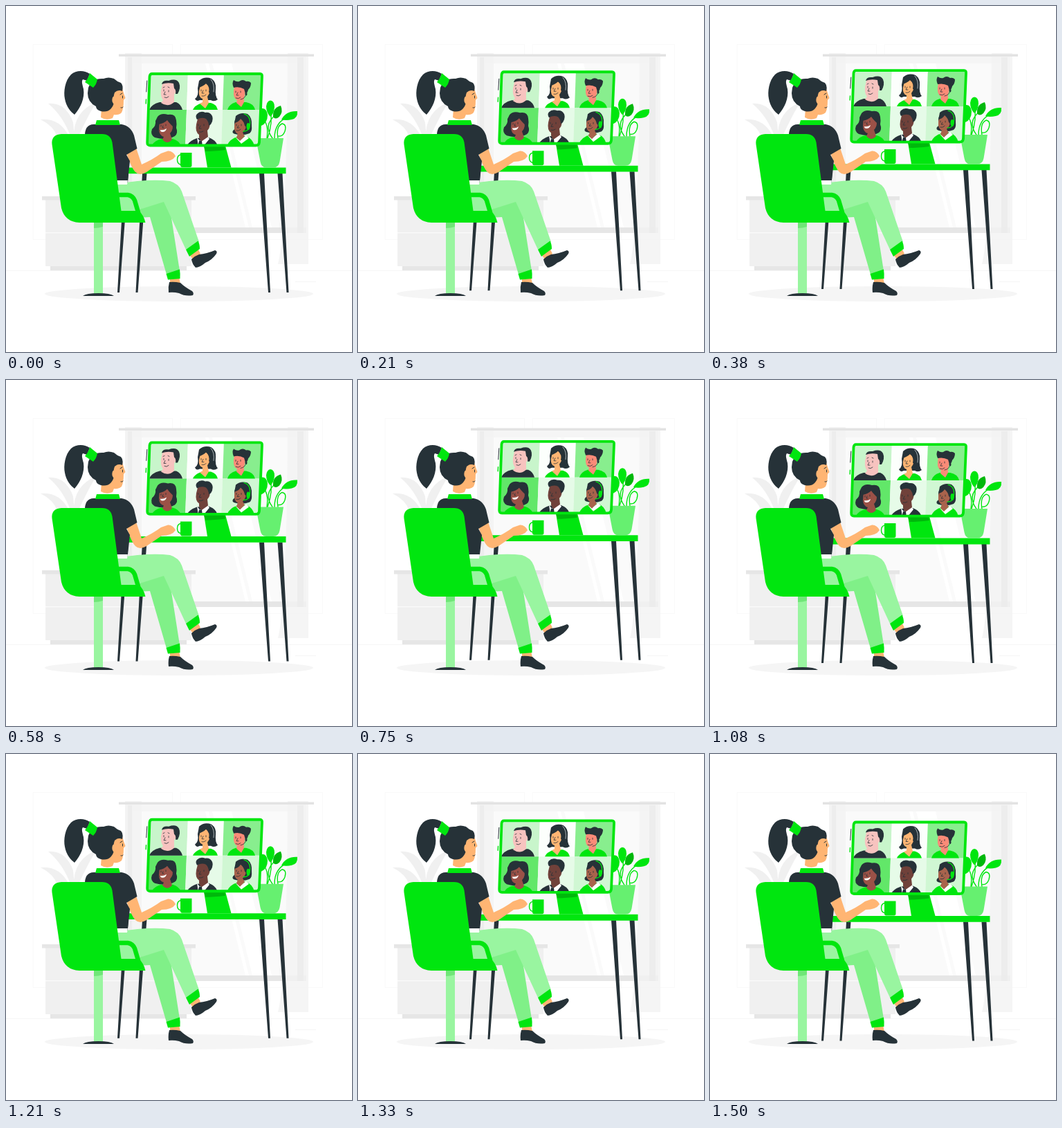
An HTML page that plays this animation: 500x500 px, repeating every 1.54 s.

```html
<!DOCTYPE html>
<html lang="en">
<head>
<meta charset="utf-8">
<title>Video meeting</title>
<style>
html, body { margin: 0; width: 100%; height: 100%; overflow: hidden; background: #fff; }
svg { display: block; width: 100%; height: 100%; }
.g { fill: #00e60f; }
.d { fill: #263238; }
.l { fill: #99f5a0; }
.w { fill: #fff; }
.s { fill: #ffb573; }
.line { fill: none; stroke-linecap: round; stroke-linejoin: round; }
.ink { stroke: #263238; }
.stem { stroke: #00e60f; }
</style>
</head>
<body>
<svg viewBox="0 0 500 500">
  <defs>
    <clipPath id="screen"><path d="M211 99H366Q369 99 369 102L365 197Q365 201 361 201H208Q204 201 205 197L208 102Q208 99 211 99Z"/></clipPath>
  </defs>

  <!-- room -->
  <g>
    <path class="line" stroke="#f9f9f9" d="M39.500 55.500H240.500V337.500H39.500ZM252.500 55.500H457.500V337.500H252.500Z"/>
    <path fill="#ededed" d="M172 73H434V328H172Z"/>
    <path fill="#f5f5f5" d="M172 73H434V320H172Z"/>
    <path fill="#fafafa" d="M183 83H421V320H183Z"/>
    <path fill="#fff" d="M298 83H326L384 320H356ZM288 83H293L351 320H346Z"/>
    <path fill="#e6e6e6" d="M268 320H434V328H268Z"/>
    <path fill="#f3f3f3" opacity=".8" d="M407 68H437V373H393Q406 320 407 68ZM172 68H196V275H172Z"/>
    <path fill="#ebebeb" opacity=".7" d="M421 74H430V328H421ZM176 74H182V275H176Z"/>
    <path fill="#e3e3e3" d="M163 69.500H445V73H163Z"/>
    <path fill="#f0f0f0" d="M61 141Q86 139 97 168L99 190H94Q82 158 61 141ZM50 164Q77 161 91 188H74Q68 173 50 164ZM98 190Q97 152 131 139Q121 153 104 190Z"/>
    <path fill="#f0f0f0" d="M57 280H268V376H57Z"/>
    <path fill="#e6e6e6" d="M52 275H274V280.500H52ZM64 376H261V382H64Z"/>
    <path fill="#fafafa" d="M57 327H268V328.500H57Z"/>
    <path fill="#ebebeb" d="M0 382H500V382.600H0ZM418 398H448V398.600H418Z"/>
    <ellipse cx="250" cy="416" rx="194" ry="11" fill="#f5f5f5"/>
  </g>

  <!-- floating desk -->
  <g id="desk">
    <path class="d" d="M171 242H177L164 414H161ZM197 242H203.500L190.500 414H187.500ZM366 242H373L382 414H379ZM392.500 242H399.500L408.500 414H405.500Z"/>
    <path class="g" d="M163 233.500H404.500V242.300H163Z"/>

    <g>
      <path class="line stem" stroke-width="1.400" d="M377 191Q380 170 371 164M378 191Q386 168 382 150M385 191Q371 172 390 157M388 191Q388 168 408 160M393 191Q390 174 399 170Q406 171 403 181Q400 189 394 188"/>
      <path class="g" d="M366 149Q376 145 378 157Q378 169 369 173Q361 162 366 149ZM382 136.500Q388 137 388 146Q387 156 382 160Q376 154 376 145Q377 137 382 136.500ZM421 152Q422 162 413 164Q404 166 398 164Q405 151 421 152Z"/>
      <path fill="#00b80c" d="M397 144Q401 153 395 160Q389 165 386 160Q385 147 397 144Z"/>
      <path fill="#66f070" d="M361 191H401L395.500 225Q394 233.500 386 233.500H376Q369 233.500 367.500 225Z"/>
    </g>

    <path class="g" d="M286 202H317L325.500 233.500H291Z"/>
    <path d="M286 202H316L317 208Q300 210 288 210Z" fill="#00b80c"/>
    <path class="g" d="M252 212H268.500V230Q268.500 233 266 233H254.500Q252 233 252 230Z"/>
    <path class="line stem" stroke-width="1.400" d="M252 215Q247.500 216 247.500 222T252 229"/>

    <g clip-path="url(#screen)">
      <path fill="#c8f5cb" d="M200 95H263L261 150H200Z"/>
      <path fill="#fcfffc" d="M263 95H315L313 150H261Z"/>
      <path fill="#88ee8e" d="M315 95H375V150H313Z"/>
      <path fill="#62e769" d="M200 150H261L259 205H200Z"/>
      <path fill="#e6fbe8" d="M261 150H313L311 205H259Z"/>
      <path fill="#d0f7d3" d="M313 150H375V205H311Z"/>

      <g>
        <path class="d" d="M207 150Q210 142 222 139L246 139Q253 142 255 150Z"/>
        <path fill="#f7c3bf" d="M226 113Q232 107 240 110Q248 114 246 124L243 128L243 139Q234 147 224 140L227 136Q223 131 224 122Z"/>
        <path class="d" d="M225 113Q226 107 235 108Q246 104 250 111Q253 118 248 127L245 127Q246 121 243 119L242 112Q233 110 225 113Z"/>
        <path class="line ink" stroke-width=".8" d="M228 121V123M235 122V124M227 118L229 117M234 117L236 118M230 124L228 128L231 128M229 132Q232 134 235 131"/>
      </g>
      <g>
        <path class="d" d="M279 108Q287 101 297 105Q304 110 303 119Q302 131 306 135Q301 139 296 136L280 136Q275 139 273 134Q279 130 277 119Z"/>
        <path class="g" d="M270 150Q272 144 283 140L296 140Q304 142 306 150Z"/>
        <path class="s" d="M281 114Q287 110 294 114Q297 123 291 131L293 140L288 148L280 141L284 139V134Q278 132 279 123Z"/>
        <path class="d" d="M278 118Q280 107 291 108Q300 114 297 126L293 125Q295 117 289 112Q285 116 278 118Z"/>
        <path class="line ink" stroke-width=".8" d="M282 121V123M289 121V123M285 122L283 126L286 126M283 130Q287 131 289 128"/>
        <path class="line" stroke="#dfe4e5" stroke-width=".7" d="M296 106Q302 113 300 124"/>
      </g>
      <g>
        <path class="g" d="M320 150Q322 142 332 139L347 139Q358 141 360 150Z"/>
        <path fill="#fb8b78" d="M330 116Q340 113 346 118L345 129Q343 134 344 139L340 146L333 140L334 136Q328 133 329 123Z"/>
        <path class="d" d="M329 118Q326 111 329 107Q333 110 337 109Q342 105 347 109Q351 108 354 111Q354 117 350 121Q349 126 346 127L344 120Q337 116 329 118Z"/>
        <path class="line ink" stroke-width=".8" d="M332 123V125M339 123V125M335 125L333 129L336 129M332 133Q336 135 339 132M347 127Q346 134 339 135"/>
        <ellipse class="d" cx="347" cy="127" rx="1.500" ry="2.500"/>
      </g>
      <g>
        <path class="d" d="M219 160Q224 154 234 157Q245 155 246 165Q247 171 246 176Q249 184 244 188Q232 195 215 190Q208 186 211 178Q217 173 216 166Z"/>
        <path class="g" d="M210 203Q214 194 225 192H241Q251 195 253 203Z"/>
        <path fill="#9b5147" d="M222 166Q231 161 240 167Q243 178 237 184L240 193Q233 201 226 193L228 189Q221 187 221 178Z"/>
        <path class="d" d="M220 171Q221 161 232 161Q243 163 242 175L238 171Q235 168 233 165Q228 170 220 171Z"/>
        <path class="w" d="M223 179Q228 180 232 177Q231 182 226 182Q223 182 223 179Z"/>
        <path class="line ink" stroke-width=".8" d="M224 172V174M231 171V173M227 173L226 176H228"/>
      </g>
      <g>
        <path class="d" d="M261 203Q264 195 276 191L293 190Q304 194 306 203Z"/>
        <path class="w" d="M276 190L280 195L291 188L294 192L285 203H278Z"/>
        <path fill="#70413a" d="M277 163Q285 158 293 164Q297 174 291 180L292 189L282 196L279 190V186Q273 182 275 171Z"/>
        <path class="d" d="M276 164Q273 159 276 156Q281 151 288 154Q295 153 298 159Q300 165 296 171L293 173Q293 167 289 163Q283 160 276 164ZM279 195L283 195L284 203H277Z"/>
        <path class="line ink" stroke-width=".8" d="M278 171V173M286 171V173M281 173L279 177H282M279 182Q282 183 285 181"/>
      </g>
      <g>
        <path class="d" d="M332 159Q339 153 349 156Q356 161 355 173Q356 181 352 184Q342 188 331 185Q326 184 328 180Q332 178 330 170Z"/>
        <path class="g" d="M319 203Q322 193 334 189L347 188Q357 192 359 203Z"/>
        <path class="w" d="M331 189L338 194L347 187L351 191L340 199Z"/>
        <path fill="#a9634c" d="M332 164Q341 160 347 167Q348 178 342 183L345 188L338 195L333 190L335 185Q329 182 330 172Z"/>
        <path class="d" d="M330 169Q331 159 341 159Q352 163 349 177L345 173Q344 167 339 163Q336 168 330 169Z"/>
        <path class="line stem" stroke-width="1.300" d="M344 156Q355 159 352 175Q350 181 343 181"/>
        <ellipse class="g" cx="350" cy="174" rx="2.500" ry="5"/>
        <path class="line ink" stroke-width=".8" d="M333 171V173M340 171V173M336 173L334 176H337M333 180Q337 181 339 178"/>
      </g>
    </g>
    <path class="line stem" stroke-width="3.800" d="M211 98H367Q370.500 98 370 102L366 197Q365.500 201.500 361 201.500H208Q204 201.500 204.200 197L207.500 102Q208 98 211 98Z"/>
    <path class="line ink" d="M203.800 108L202.800 124"/>
    <path class="line stem" stroke-width="1.400" d="M202.500 135L202.200 141"/>
  </g>

  <!-- chair post -->
  <path class="l" d="M127 312H140V416H127Z"/>
  <path fill="#70e678" d="M127 312H140V319Q134 321 127 321Z"/>
  <path class="d" d="M111 419Q116 415 133.500 415T156 419Z"/>

  <!-- sitter -->
  <g>
    <path class="s" d="M237 393L250 392L252 401L237 402ZM264 358L277 350L281 358L270 366Z"/>
    <path fill="#80f088" d="M188 294L229 281Q236 289 239 306L251 383L232 388L208 305L190 306Z"/>
    <path class="l" d="M160 257Q208 249 237 253Q250 257 254 268L279 341L260 352L228 283L190 295L170 313H150Z"/>
    <path class="g" d="M260 352L277.500 339.500Q280 344 280 351L265 362ZM231.500 387L251 380.500Q252 387 251.500 394L234 395.500Z"/>
    <path class="d" d="M268 366Q273 361 279 359Q290 358 302 353Q306 354 304 358Q298 367 288 371Q280 378 274 378Q269 373 268 366ZM236 399Q243 398 252 400Q258 406 269 412Q272 415 270 418Q259 420 250 415Q242 413 235 414Q234 406 236 399Z"/>
    <path class="w" d="M158 251H176L175 258H160Z"/>
    <path class="s" d="M174 212Q181 234 187 240Q193 246 203 240L225 225Q240 225 245 217Q241 209 234 209.500L224 213Q212 222 196 229L188 205Z"/>
    <path class="d" d="M114 190Q113 171 127 171H167Q180 173 185 187L189.500 206L174 215L179 224L176 252H140Z"/>
    <path class="g" d="M131 165H163L165 172H129Z"/>
    <path class="s" d="M139 135L150 123L168 119Q170 126 172.500 133L170 136Q170 148 167 154Q163 158 156 157L154 162Q145 166 137 161Z"/>
    <path class="d" d="M119 118Q124 104 141 105Q148 102 156 105Q160 109 166 111Q170 115 168 123Q162 120 157 125Q155 129 156 134Q157 142 152 148Q147 154 137 152Q130 150 130 145Q118 139 118 126Z"/>
    <path class="d" d="M121 98C112 92 101 93 94 99C85 108 83 124 85 134C87 146 94 153 99 157C108 147 114 133 112 120C110 112 109 109 111 106L117 108Z"/>
    <path class="g" d="M114 110Q119 105 121 97L132 106Q131 113 126 118Z"/>
    <path class="s" d="M154 132Q158 127 160 132Q160 139 156 142Q152 138 154 132Z"/>
    <path class="line ink" stroke-width="1" d="M168.500 130V133M165 128L168 126M166 147Q168 148 169 146"/>
  </g>

  <!-- chair -->
  <path class="line stem" stroke-width="6.500" d="M160 273H176Q183 274 186 281L191 298"/>
  <path class="g" d="M80 185H139Q151 185 153.500 197L166.500 296H192Q199 302 201.500 313H106Q85 312 80 292L66.500 200Q65 186 80 185Z"/>
</svg>
<script>
const LOOP = 1540, LOW = 1500, LIFT = 10;
const desk = document.getElementById('desk');

// steady climb and fall: 0 at the lowest point, 1 at the highest
function rise(t) {
  const p = ((t - LOW) / LOOP + 2) % 1;
  return 1 - Math.abs(2 * p - 1);
}

function draw(t) {
  const y = LIFT * (rise(0) - rise(t));
  desk.setAttribute('transform', `translate(0 ${y.toFixed(3)})`);
}

const start = performance.now();
function tick() {
  draw((performance.now() - start) % LOOP);
  requestAnimationFrame(tick);
}
draw(0);
requestAnimationFrame(tick);
</script>
</body>
</html>
```
